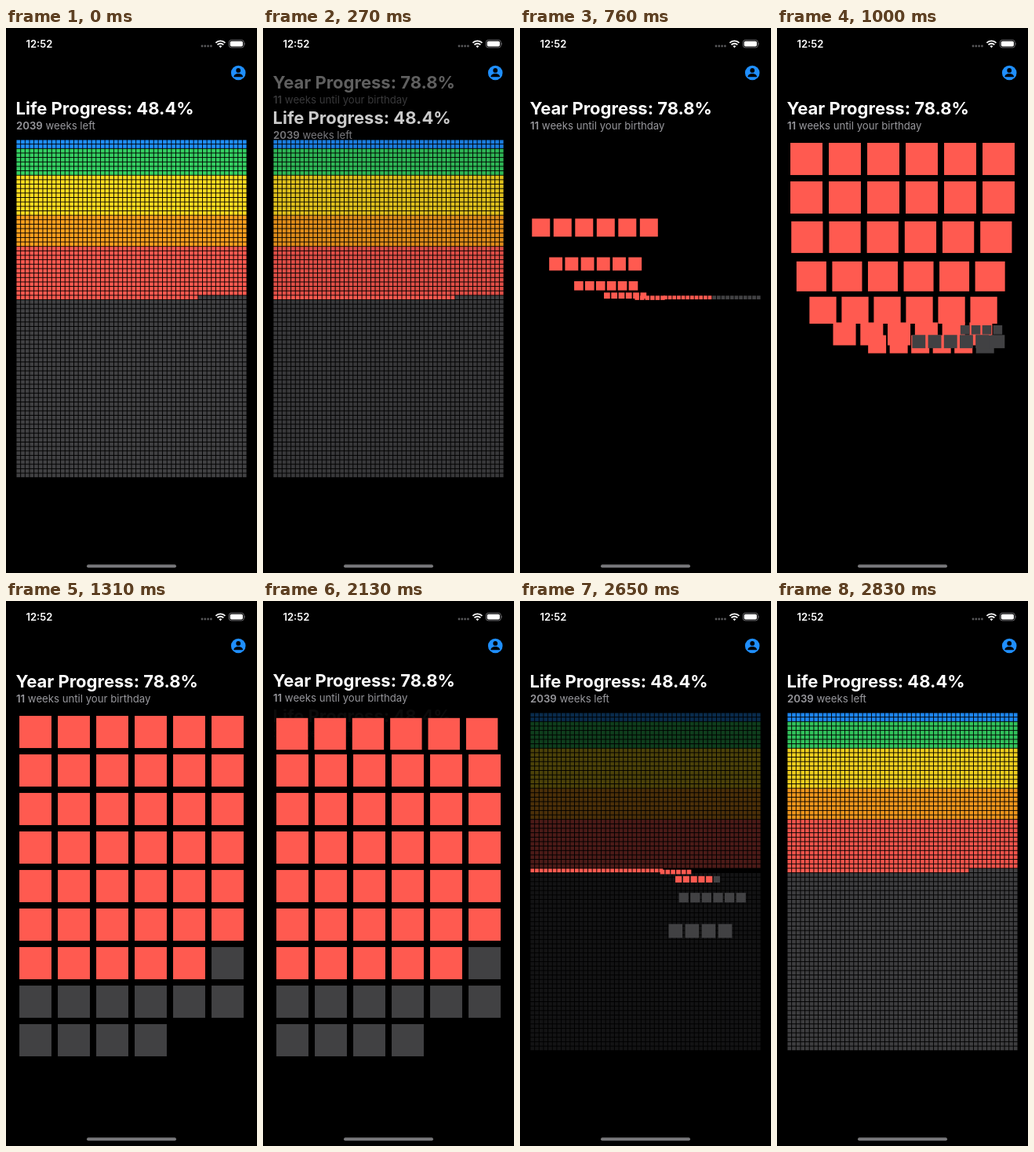
An HTML page with a canvas that plays this animation: 320 by 693 pixels, repeating every 2860 ms.

```html
<!DOCTYPE html>
<html lang="en">
<head>
<meta charset="utf-8">
<title>Life Progress</title>
<style>
  html, body { margin: 0; width: 100%; height: 100%; overflow: hidden; background: #000; }
  svg, canvas { position: absolute; left: 0; top: 0; width: 320px; height: 693px; }
  text { font-family: Inter, "Liberation Sans", sans-serif; fill: #fff; }
  .clock { font-size: 13px; font-weight: 600; }
  .title { font-size: 22px; font-weight: 700; }
  .sub { font-size: 13.2px; fill: #98989d; }
  .sub tspan { font-weight: 600; }
</style>
</head>
<body>
<svg viewBox="0 0 320 693">
  <text class="clock" x="25.5" y="25">12:52</text>
  <g fill="#58585a">
    <circle cx="250" cy="23" r="1.4"/><circle cx="253.8" cy="23" r="1.4"/>
    <circle cx="257.6" cy="23" r="1.4"/><circle cx="261.4" cy="23" r="1.4"/>
  </g>
  <g fill="none" stroke="#fff" stroke-width="1.9">
    <path d="M267.4 18.9a8.4 8.4 0 0 1 12 0"/>
    <path d="M269.5 21.3a5.5 5.5 0 0 1 7.8 0"/>
  </g>
  <path d="M273.4 25.2l-2-2.1a2.9 2.9 0 0 1 4 0z" fill="#fff"/>
  <rect x="284.3" y="15.3" width="19" height="9.6" rx="2.9" fill="none" stroke="#77777a" stroke-width=".9"/>
  <rect x="285.7" y="16.7" width="16.2" height="6.8" rx="1.7" fill="#fff"/>
  <path d="M304.4 18.5q1.5 1.6 0 3.2z" fill="#77777a"/>

  <circle cx="296.2" cy="57" r="9.3" fill="#1f8fff"/>
  <circle cx="296.2" cy="53.9" r="2.9" fill="#000"/>
  <path d="M290.4 62.2c0-2.6 2.6-4.2 5.8-4.2s5.8 1.6 5.8 4.2z" fill="#000"/>

  <g id="life">
    <text class="title" x="12.5" y="110">Life Progress: 48.4%</text>
    <text class="sub" x="13" y="129"><tspan>2039</tspan> weeks left</text>
  </g>
  <g id="year">
    <text class="title" x="12.5" y="110">Year Progress: 78.8%</text>
    <text class="sub" x="13" y="129"><tspan>11</tspan> weeks until your birthday</text>
  </g>
  <rect x="103" y="682.3" width="114" height="4" rx="2" fill="#77777a"/>
</svg>
<canvas id="cells"></canvas>
<script>
const LOOP = 2860, LEFT = 13, TOP = 142, WIDTH = 294;
const WEEKS = 52, YEARS = 76, COLS = 6, NOW_ROW = 35, WEEKS_DONE = 41;
const SMALL = WIDTH / WEEKS, BIG = WIDTH / COLS, FILL = 0.835;
const RED = '#ff5a50', GRAY = '#414143';
// [first row below the band, colour]
const BANDS = [[2, '#1f8fff'], [8, '#35d062'], [17, '#ffdc20'], [24, '#ffa01e'],
               [NOW_ROW, RED], [YEARS, GRAY]];
const MOVE = 400, STAGGER = 40, SLIDE = 45;

const life = document.getElementById('life');
const year = document.getElementById('year');
const canvas = document.getElementById('cells');
const ctx = canvas.getContext('2d');
const dpr = window.devicePixelRatio || 1;
canvas.width = 320 * dpr;
canvas.height = 693 * dpr;
ctx.scale(dpr, dpr);

// cubic-bezier(.42, 0, .58, 1)
function ease(x) {
  if (x <= 0) return 0;
  if (x >= 1) return 1;
  let lo = 0, hi = 1, s = 0.5;
  for (let i = 0; i < 24; i++) {
    s = (lo + hi) / 2;
    const bx = 1.26 * (1 - s) * (1 - s) * s + 1.74 * (1 - s) * s * s + s * s * s;
    if (bx < x) lo = s; else hi = s;
  }
  return s * s * (3 - 2 * s);
}
const ramp = (t, start, length = MOVE) => ease((t - start) / length);
const lerp = (a, b, p) => a + (b - a) * p;

function cell(cx, cy, pitch, color) {
  const size = pitch * FILL;
  ctx.fillStyle = color;
  ctx.fillRect(cx - size / 2, cy - size / 2, size, size);
}

function place(el, offset, visible) {
  el.setAttribute('transform', `translate(0 ${offset.toFixed(3)})`);
  el.setAttribute('opacity', Math.pow(visible, 0.75).toFixed(4));
}

function drawLife(alpha) {
  if (alpha <= 0) return;
  ctx.globalAlpha = alpha;
  for (let r = 0; r < YEARS; r++) {
    if (r === NOW_ROW) continue;
    const color = BANDS.find(b => r < b[0])[1];
    for (let c = 0; c < WEEKS; c++) {
      cell(LEFT + (c + 0.5) * SMALL, TOP + (r + 0.5) * SMALL, SMALL, color);
    }
  }
  ctx.globalAlpha = 1;
}

// The current year's weeks unfold row by row from one line into six columns.
function drawYear(t) {
  const lineY = TOP + (NOW_ROW + 0.5) * SMALL;
  for (let i = 0; i < WEEKS; i++) {
    const row = Math.floor(i / COLS), col = i % COLS, wait = row * STAGGER;
    const p = ramp(t, 560 + wait) - ramp(t, 2097 + wait);
    cell(lerp(LEFT + (i + 0.5) * SMALL, LEFT + (col + 0.5) * BIG, p),
         lerp(lineY, TOP + (row + 0.5) * BIG, p),
         lerp(SMALL, BIG, p), i < WEEKS_DONE ? RED : GRAY);
  }
}

function render(time) {
  let t = time % LOOP;
  if (t < 150) t = 0;
  else if (t > 1310 && t < 2130) t = 1310;

  const p = ramp(t, 128) - ramp(t, 2097);
  place(life, SLIDE * p, 1 - p);
  place(year, -SLIDE * (1 - p), p);

  ctx.clearRect(0, 0, 320, 693);
  drawLife(1 - ramp(t, 160, 450) + ramp(t, 2500));
  drawYear(t);
}

const begin = performance.now();
function tick() {
  render(performance.now() - begin);
  requestAnimationFrame(tick);
}
tick();
</script>
</body>
</html>
```
